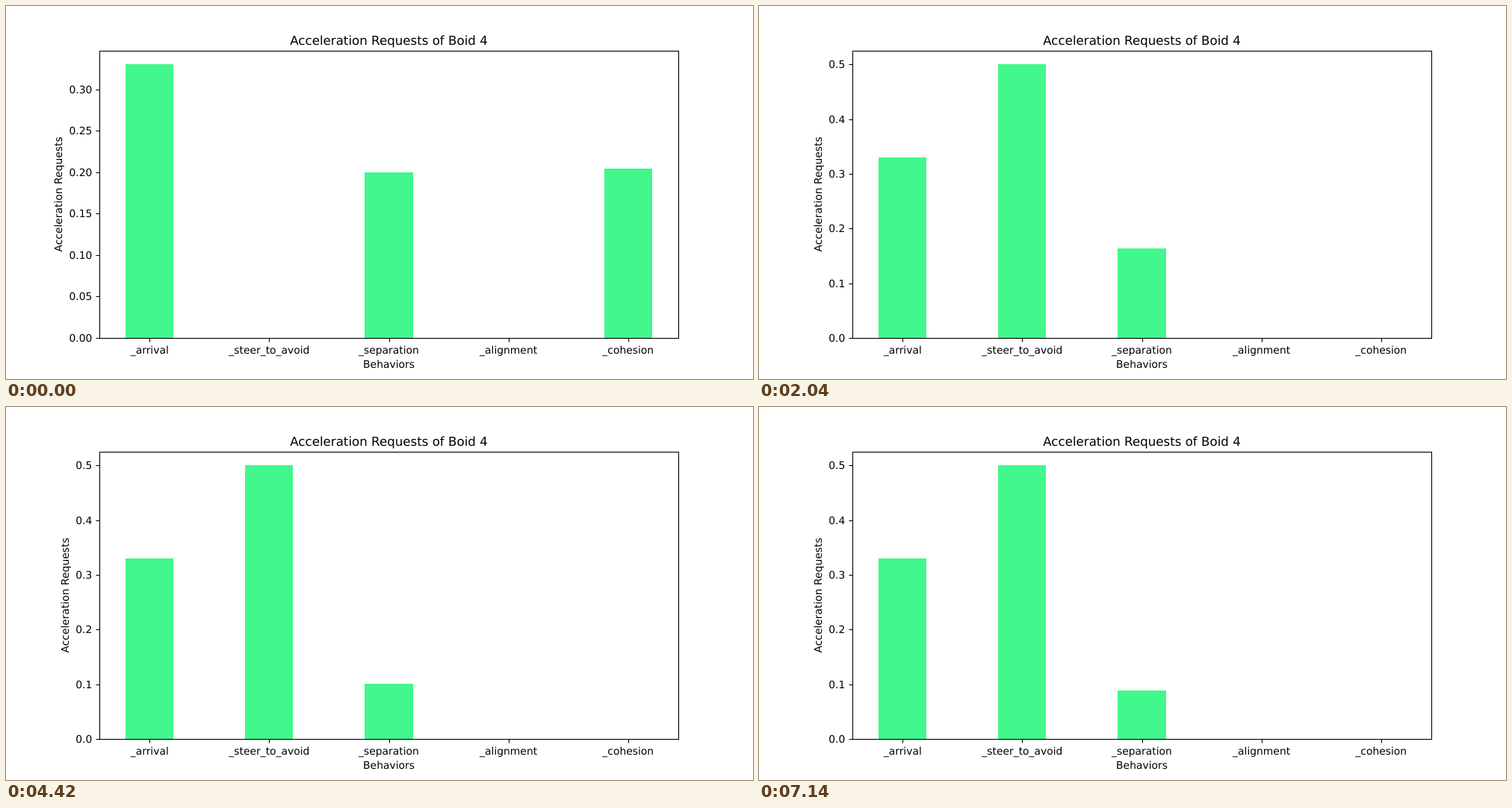
These frames come from a looping animation (1000 by 500 pixels, 8 s). An HTML page with a canvas:

```html
<!DOCTYPE html>
<html lang="en">
<head>
<meta charset="utf-8">
<title>Acceleration Requests</title>
<style>
  html, body { margin: 0; width: 100%; height: 100%; overflow: hidden; background: #fff; }
  canvas { display: block; width: 1000px; height: 500px; }
</style>
</head>
<body>
<canvas id="chart" width="1000" height="500"></canvas>
<script>
const ctx = document.getElementById('chart').getContext('2d');

const LOOP = 8000, STEP = 340;
const LEFT = 125, RIGHT = 900, TOP = 60, BASE = 445;
const MID_X = (LEFT + RIGHT) / 2, MID_Y = (TOP + BASE) / 2;
const UNIT = (RIGHT - LEFT) / 4.84;   // five bars 0.4 wide plus 5% margins
const GREEN = '#42f78c';
const FONT = '"DejaVu Sans", sans-serif';
const SMALL = 10 * 100 / 72, LARGE = 12 * 100 / 72;

const names = ['_arrival', '_steer_to_avoid', '_separation', '_alignment', '_cohesion'];

// Top edge of the separation bar, one entry per step from the third step on
const separationTops = [295, 295, 303, 314, 325, 338, 346, 353, 357, 362,
  366, 371, 367, 361, 365, 369, 373, 375, 378, 380];

const firstScene = {
  tops: [78, BASE, 223, BASE, 218],
  scale: 1110.8, tick: 0.05, ticks: 7, digits: 2, labelX: 75
};

function laterScene(step) {
  const i = Math.min(step - 2, separationTops.length - 1);
  return {
    tops: [203, 78, separationTops[i], BASE, BASE],
    scale: 733.333, tick: 0.1, ticks: 6, digits: 1, labelX: 84
  };
}

const centerX = i => LEFT + (0.42 + i) * UNIT;

function text(str, x, y, align = 'center', size = SMALL) {
  ctx.font = `${size}px ${FONT}`;
  ctx.textAlign = align;
  ctx.fillText(str, x, y);
}

function line(x1, y1, x2, y2) {
  ctx.beginPath();
  ctx.moveTo(x1, y1);
  ctx.lineTo(x2, y2);
  ctx.stroke();
}

function drawBars(tops) {
  ctx.fillStyle = GREEN;
  tops.forEach((top, i) => {
    const x1 = Math.round(centerX(i) - 0.2 * UNIT);
    const x2 = Math.round(centerX(i) + 0.2 * UNIT);
    ctx.fillRect(x1, top, x2 - x1, BASE - top);
  });
}

function drawAxes(scene) {
  ctx.fillStyle = ctx.strokeStyle = '#000';
  ctx.lineWidth = 0.8 * 100 / 72;
  names.forEach((name, i) => {
    const x = Math.round(centerX(i) + 1e-6) + 0.5;
    line(x, BASE + 0.5, x, BASE + 5.5);
    text(name, centerX(i), 466);
  });
  for (let i = 0; i < scene.ticks; i++) {
    const value = i * scene.tick;
    const y = Math.round(BASE - value * scene.scale);
    line(LEFT - 4.5, y + 0.5, LEFT + 0.5, y + 0.5);
    text(value.toFixed(scene.digits), 115.3, y + 5, 'right');
  }
  ctx.strokeRect(LEFT + 0.5, TOP + 0.5, RIGHT - LEFT, BASE - TOP);
}

function drawTitles(scene) {
  text('Acceleration Requests of Boid 4', MID_X, 52, 'center', LARGE);
  text('Behaviors', MID_X, 485);
  ctx.save();
  ctx.translate(scene.labelX, MID_Y);
  ctx.rotate(-Math.PI / 2);
  text('Acceleration Requests', 0, 0);
  ctx.restore();
}

function draw(time) {
  const step = Math.floor((time % LOOP) / STEP);
  const scene = step < 2 ? firstScene : laterScene(step);
  ctx.textRendering = 'geometricPrecision';
  ctx.fillStyle = '#fff';
  ctx.fillRect(0, 0, 1000, 500);
  drawBars(scene.tops);
  drawAxes(scene);
  drawTitles(scene);
}

const start = performance.now();
function frame() {
  draw(performance.now() - start);
  requestAnimationFrame(frame);
}
frame();
</script>
</body>
</html>
```
